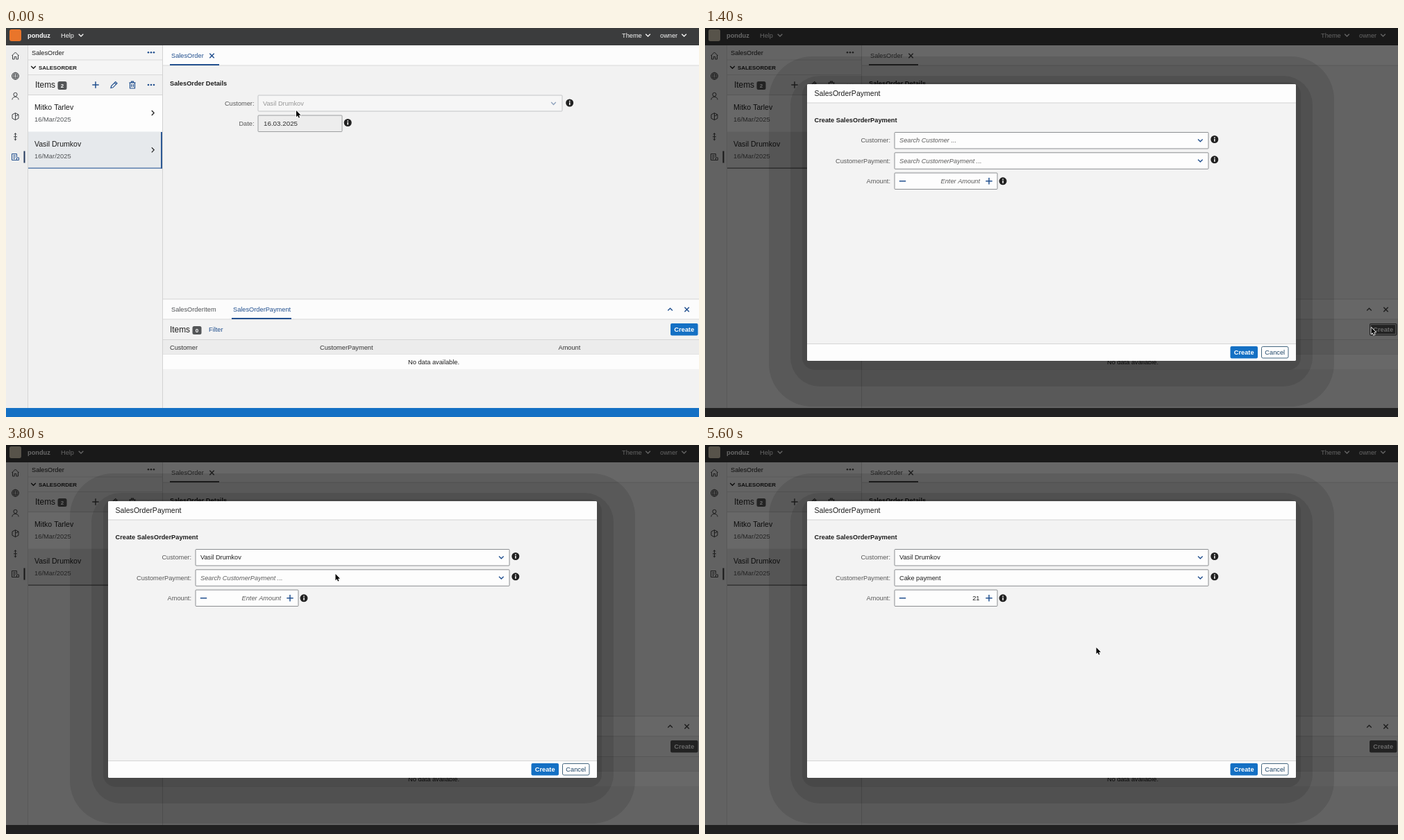
Write an HTML page with a canvas that moves like this. It is 998 px wide and 561 px high and loops after 5670 ms.

```html
<!DOCTYPE html>
<html lang="en">
<head>
<meta charset="utf-8">
<title>Sales order payment</title>
<style>
html, body { margin: 0; width: 100%; height: 100%; overflow: hidden; background: #f2f2f2; }
canvas { display: block; width: 998px; height: 561px; }
</style>
</head>
<body>
<canvas id="stage" width="998" height="561"></canvas>
<script>
const ctx = document.getElementById('stage').getContext('2d');
const W = 998, H = 561, LOOP = 5670, TICK = 1000 / 15;
const FONT = '"Liberation Sans", Arial, sans-serif';
const INK = '#1d1d1d', LABEL = '#595959', BLUE = '#22508f', BRAND = '#1470c4';
const BODY = 9.24, LARGE = 10.56, TITLE = 11.88;
const CUSTOMER = 'Vasil Drumkov';

// Moments in ms at which the interface changes
const AT = {
  press: 1270, dialog: 1400, focus: 2400, list1: 2470, hover1: 3130, press1: 3470, pick1: 3530,
  list2: 4130, hoverA: 4500, hoverB: 4550, press2: 4730, pick2: 4800, type1: 4930, type2: 5070, blur: 5200
};

// Pointer stops: time, x, y
const STOPS = [
  [0, 418, 119], [1130, 968, 432], [1270, 967.5, 432], [1400, 959.5, 432], [1600, 952, 428],
  [1800, 952, 428], [2200, 473.5, 161], [2870, 473.5, 161], [3400, 474.5, 185], [4200, 474.5, 187],
  [4467, 474.5, 206], [4600, 476, 244], [5467, 476, 244], [5600, 563.5, 292], [LOOP, 563.5, 292]
];

const ICONS = [
  'M-5 0L0 -5 5 0M-4 -1V5H-1.3V1.5H1.3V5H4V-1',
  'M-5 0A5 5 0 1 0 5 0A5 5 0 1 0 -5 0H5M0 -5C-3 -2 -3 2 0 5C3 2 3 -2 0 -5M-4.3 -2.4H4.3M-4.3 2.4H4.3',
  'M-2.6 -2.5A2.6 2.6 0 1 0 2.6 -2.5A2.6 2.6 0 1 0 -2.6 -2.5M-4.6 5C-4.6 -.4 4.6 -.4 4.6 5',
  'M0 -5L4.5 -2.7V2.7L0 5L-4.5 2.7V-2.7ZL0 -.3 4.5 -2.7M0 -.3V5',
  'M0 -5V5M-1.8 -3.3L0 -5 1.8 -3.3M-1.8 3.3L0 5 1.8 3.3M-2.5 0H2.5',
  'M-5 -4.5H2V0M-5 -4.5V4.5H5V1H2V4.5M-3.2 -2.2H.4M-3.2 0H.4M-3.2 2.2H-.5'
].map(d => new Path2D(d));
const PENCIL = new Path2D('M-4.5 4.5L-3.8 1.5 2.2 -4.5 4.5 -2.2 -1.5 3.8ZM.7 -3L3 -.7');
const TRASH = new Path2D('M-4.5 -3.2H4.5M-1.5 -3.2V-4.8H1.5V-3.2M-3.5 -3.2V5H3.5V-3.2M-1.3 -1V3M1.3 -1V3');
const ARROW = new Path2D('M0 0V9.2L2.1 7.3 3.5 10.6 5 10 3.6 6.8H6.5Z');

function text(s, x, y, color = INK, size = BODY, style = '', align = 'left') {
  ctx.font = `${style} ${size}px ${FONT}`;
  ctx.fillStyle = color;
  ctx.textAlign = align;
  ctx.fillText(s, x, y);
}

function rect(x, y, w, h, color) {
  ctx.fillStyle = color;
  ctx.fillRect(x, y, w, h);
}

function box(x, y, w, h, fill, border, r = 1) {
  ctx.beginPath();
  if (border) ctx.roundRect(x + .5, y + .5, w - 1, h - 1, r);
  else ctx.roundRect(x, y, w, h, r);
  ctx.fillStyle = fill;
  ctx.fill();
  if (!border) return;
  ctx.strokeStyle = border;
  ctx.lineWidth = 1;
  ctx.stroke();
}

function icon(path, x, y, color, width = 1) {
  ctx.save();
  ctx.translate(x, y);
  ctx.strokeStyle = color;
  ctx.lineWidth = width;
  ctx.stroke(path);
  ctx.restore();
}

function lines(x, y, color, width, ...points) {
  const path = new Path2D();
  points.forEach(([px, py, move]) => move ? path.moveTo(px, py) : path.lineTo(px, py));
  icon(path, x, y, color, width);
}

const chevron = (x, y, color, dir = 1) =>
  lines(x, y, color, 1.4, [-3.3, -1.6 * dir, 1], [0, 1.7 * dir], [3.3, -1.6 * dir]);
const chevronRight = (x, y) => lines(x, y, INK, 1.2, [-1.7, -3.5, 1], [1.7, 0], [-1.7, 3.5]);
const cross = (x, y, color) =>
  lines(x, y, color, 1.5, [-3.2, -3.2, 1], [3.2, 3.2], [3.2, -3.2, 1], [-3.2, 3.2]);
const minus = (x, y) => lines(x, y, BLUE, 1.5, [-4.7, 0, 1], [4.7, 0]);
const plus = (x, y) => {
  minus(x, y);
  lines(x, y, BLUE, 1.5, [0, -4.7, 1], [0, 4.7]);
};

function dots(x, y) {
  for (const dx of [-4, 0, 4]) box(x + dx - 1.3, y - 1.3, 2.6, 2.6, BLUE, null, 1.3);
}

function info(x, y) {
  box(x - 5.5, y - 5.5, 11, 11, '#222', null, 5.5);
  rect(x - .7, y - 3.2, 1.5, 1.6, '#fff');
  rect(x - .7, y - .7, 1.5, 3.8, '#fff');
}

function badge(s, x, y) {
  box(x, y, 13, 12, '#535557', null, 2.5);
  text(s, x + 6.5, y + 9, '#fff', 8, 'bold', 'center');
}

function button(s, x, y, fill, border, color, style) {
  box(x, y, 39.5, 17.5, fill, border, 2);
  text(s, x + 19.7, y + 12.2, color, BODY, style, 'center');
}

function topBar() {
  rect(0, 0, W, 25, '#3b3c3d');
  box(5, 2, 17, 17, '#e9752b', null, 3);
  text('ponduz', 31, 13.5, '#fff', BODY, 'bold');
  for (const [s, x, cx] of [['Help', 79, 108], ['Theme', 887, 924.5], ['owner', 942, 976.5]]) {
    text(s, x, 13.5, '#f5f5f5');
    chevron(cx, 10.3, '#f5f5f5');
  }
}

function rail() {
  rect(0, 25, 31, 523, '#eeeeee');
  ICONS.forEach((p, i) => icon(p, 13.5, 40 + i * 29.2, i === 5 ? BLUE : '#3f4245'));
  rect(25.5, 177.5, 2, 17, '#23385c');
}

function listItem(name, y) {
  text(name, 41, y + 21.5, INK, LARGE);
  text('16/Mar/2025', 41, y + 38.5, '#505356', 9.4);
  chevronRight(211.5, y + 26.5);
}

function sidebar() {
  rect(31, 25, 194, 523, '#f1f1f1');
  rect(31, 25, 194, 42, '#f5f5f5');
  text('SalesOrder', 37, 38.5);
  dots(209, 35.3);
  rect(31, 45.5, 194, 1, '#d9d9d9');
  chevron(39.5, 56.5, INK);
  text('SALESORDER', 47, 59.5, INK, 7.92, 'bold');
  rect(31, 67, 194, 1, '#d9d9d9');
  text('Items', 42, 86, INK, TITLE);
  badge('2', 74.5, 77);
  plus(129, 82);
  icon(PENCIL, 155.5, 82, BLUE, 1.2);
  icon(TRASH, 182, 82, BLUE, 1.2);
  dots(209, 82);
  rect(31, 96, 194, 1, '#d5d5d5');
  rect(32, 97, 193, 53, '#fdfdfd');
  listItem('Mitko Tarlev', 96);
  rect(32, 149.5, 193, 53, '#e6e9ec');
  rect(32, 201.5, 193, 1.2, '#3a659f');
  rect(223, 150, 2, 52.5, '#2c5894');
  listItem(CUSTOMER, 149.3);
  rect(31, 25, 1, 523, '#d6d6d6');
  rect(225, 25, 1, 523, '#d2d2d2');
}

function details() {
  rect(226, 25, 772, 523, '#f2f2f2');
  rect(226, 25, 772, 29, '#fcfcfc');
  rect(226, 53.5, 772, 1, '#d9d9d9');
  text('SalesOrder', 238, 43, BLUE);
  cross(296.5, 40, BLUE);
  rect(236, 52, 71, 2, BLUE);
  text('SalesOrder Details', 236, 82.5, INK, BODY, 'bold');
  text('Customer:', 357.5, 111.8, LABEL, BODY, '', 'right');
  box(362.5, 96.5, 439, 24, '#f6f6f6', '#c2c4c6');
  text(CUSTOMER, 370, 111.8, '#979797');
  chevron(788.5, 108.7, '#8fa2bd');
  info(811.7, 108);
  text('Date:', 357.5, 141, LABEL, BODY, '', 'right');
  box(362.5, 125.5, 122, 24.5, '#ededed', '#9c9ea0');
  text('16.03.2025', 371, 141, '#303030', 9.8);
  info(492.2, 136.5);
}

function payments(t) {
  rect(226, 391, 772, 29, '#fcfcfc');
  rect(226, 390.5, 772, 1, '#d5d5d5');
  rect(226, 419.5, 772, 1, '#d9d9d9');
  text('SalesOrderItem', 238, 409, '#505356');
  text('SalesOrderPayment', 327, 409, BLUE);
  rect(325, 418, 86, 2, BLUE);
  chevron(956.5, 406, BLUE, -1);
  cross(980.5, 406, BLUE);
  text('Items', 236, 439, INK, TITLE);
  badge('0', 268.5, 430);
  text('Filter', 292, 438, BLUE);
  const hover = t >= 1060, pressed = t >= AT.press;
  button('Create', 957, 426, pressed ? '#2b5a97' : hover ? '#1263b0' : BRAND, null, '#fff', 'bold');
  if (pressed && t < 1530) {
    ctx.strokeStyle = '#fff';
    ctx.lineWidth = .8;
    ctx.strokeRect(958.7, 427.7, 36, 14);
  }
  rect(226, 449, 772, 22, '#ececec');
  rect(226, 449, 772, 1, '#d5d5d5');
  rect(226, 470.5, 772, 1, '#d9d9d9');
  text('Customer', 236, 463.5, '#333');
  text('CustomerPayment', 452, 463.5, '#333');
  text('Amount', 795.5, 463.5, '#333');
  rect(226, 471, 772, 21, '#fdfdfd');
  text('No data available.', 616, 484.7, INK, BODY, '', 'center');
}

function page(t) {
  rail();
  sidebar();
  details();
  payments(t);
  topBar();
  rect(0, 548, W, 13, BRAND);
}

function backdrop() {
  ctx.globalCompositeOperation = 'saturation';
  rect(0, 0, W, H, '#808080');
  ctx.globalCompositeOperation = 'source-over';
  rect(0, 0, W, H, 'rgba(0,0,0,.59)');
  rect(0, 548, W, 13, '#212121');
  box(5, 2, 17, 17, '#57534a', null, 3);
  const shade = 'rgba(0,0,0,.1)';
  box(92, 41, 814, 505, shade, null, 62);
  box(123, 69, 752, 448, shade, null, 42);
  box(140, 78, 718, 415, shade, null, 18);
}

function field(label, y, value, hint, focused, caret) {
  text(label, 267, y + 15.4, LABEL, BODY, '', 'right');
  box(272.5, y, 453, 24.5, '#fdfdfd', focused ? '#3f78ab' : '#8b8e91');
  if (value) text(value, 280, y + 15.4);
  else text(hint, 280, y + 15.4, '#5c5c5c', BODY, 'italic');
  if (caret) rect(280, y + 6.5, 1, 11, INK);
  chevron(713.3, y + 12, BLUE);
  info(733.8, y + 10.5);
}

function amount(t) {
  const active = t >= AT.pick2 && t < AT.blur;
  text('Amount:', 267, 224, LABEL, BODY, '', 'right');
  box(272.5, 208.5, 149, 24.5, '#fdfdfd', active ? '#3f78ab' : '#8b8e91');
  minus(284.5, 220.8);
  plus(409, 220.8);
  if (t < AT.type1) text('Enter Amount', 396, 224, '#5c5c5c', BODY, 'italic', 'right');
  else text(t < AT.type2 ? '2' : '21', 395.5, 224, INK, BODY, '', 'right');
  info(429, 220.8);
}

function menu(y, items, over, pressed) {
  const row = 26.6;
  ctx.save();
  ctx.shadowColor = 'rgba(0,0,0,.35)';
  ctx.shadowBlur = 5;
  ctx.shadowOffsetY = 1;
  box(272, y, 427, row * items.length + 1, '#fdfdfd', '#75797d', 2);
  ctx.restore();
  items.forEach((s, i) => {
    const top = y + i * row, on = i === over;
    if (on) box(273, top + 1, 425, row - 1, pressed ? '#355e93' : '#eeeeee', null, 1);
    if (on && pressed) {
      ctx.save();
      ctx.setLineDash([1, 1]);
      ctx.strokeStyle = '#fff';
      ctx.lineWidth = .8;
      ctx.strokeRect(274.5, top + 2.5, 422, row - 4);
      ctx.restore();
    }
    text(s, 282.5, top + 16.5, on && pressed ? '#fff' : INK);
  });
}

function dialog(t) {
  const between = (a, b) => t >= a && t < b;
  const blink = (t + 500) % 1000 < 500;
  const open1 = between(AT.list1, AT.pick1), open2 = between(AT.list2, AT.pick2);
  const focus1 = between(AT.focus, AT.press1), focus2 = between(4070, AT.press2);

  box(147, 81, 704, 399, '#f3f3f3', null, 2);
  box(147, 81, 704, 26.5, '#fdfdfd', null, [2, 2, 0, 0]);
  rect(147, 107.5, 704, 1, '#d6d6d6');
  box(147, 456, 704, 24, '#fdfdfd', null, [0, 0, 2, 2]);
  rect(147, 455, 704, 1, '#d6d6d6');
  text('SalesOrderPayment', 157.5, 98, INK, LARGE);
  text('Create SalesOrderPayment', 157.5, 136, INK, BODY, 'bold');
  field('Customer:', 150, t >= AT.pick1 && CUSTOMER, 'Search Customer ...', focus1, focus1 && blink);
  field('CustomerPayment:', 179.3, t >= AT.pick2 && 'Cake payment', 'Search CustomerPayment ...',
    focus2, focus2 && blink);
  amount(t);
  button('Create', 756.5, 459, BRAND, null, '#fff', 'bold');
  button('Cancel', 801, 459, '#fdfdfd', '#456780', '#1f4668', '');
  if (open1) menu(176.5, [CUSTOMER], t >= AT.hover1 ? 0 : -1, t >= AT.press1);
  if (open2) {
    const over = t >= AT.hoverB ? 1 : t >= AT.hoverA ? 0 : -1;
    menu(205.8, ['Muffins payment', 'Cake payment'], over, t >= AT.press2);
  }
}

function pointer(t) {
  const i = STOPS.findIndex(s => s[0] > t);
  const [t0, x0, y0] = STOPS[i - 1], [t1, x1, y1] = STOPS[i];
  const p = (t - t0) / (t1 - t0), e = p * p * (3 - 2 * p);
  ctx.save();
  ctx.translate(x0 + (x1 - x0) * e, y0 + (y1 - y0) * e);
  ctx.lineJoin = 'round';
  ctx.lineWidth = 1.6;
  ctx.strokeStyle = '#fff';
  ctx.stroke(ARROW);
  ctx.fillStyle = '#000';
  ctx.fill(ARROW);
  ctx.restore();
}

function draw() {
  const now = performance.now() % LOOP;
  const t = Math.floor((now + 5) / TICK) * TICK + 4;
  page(t);
  if (t >= AT.dialog) {
    backdrop();
    dialog(t);
  }
  pointer(Math.min(t, LOOP - 1));
  requestAnimationFrame(draw);
}
draw();
</script>
</body>
</html>
```
